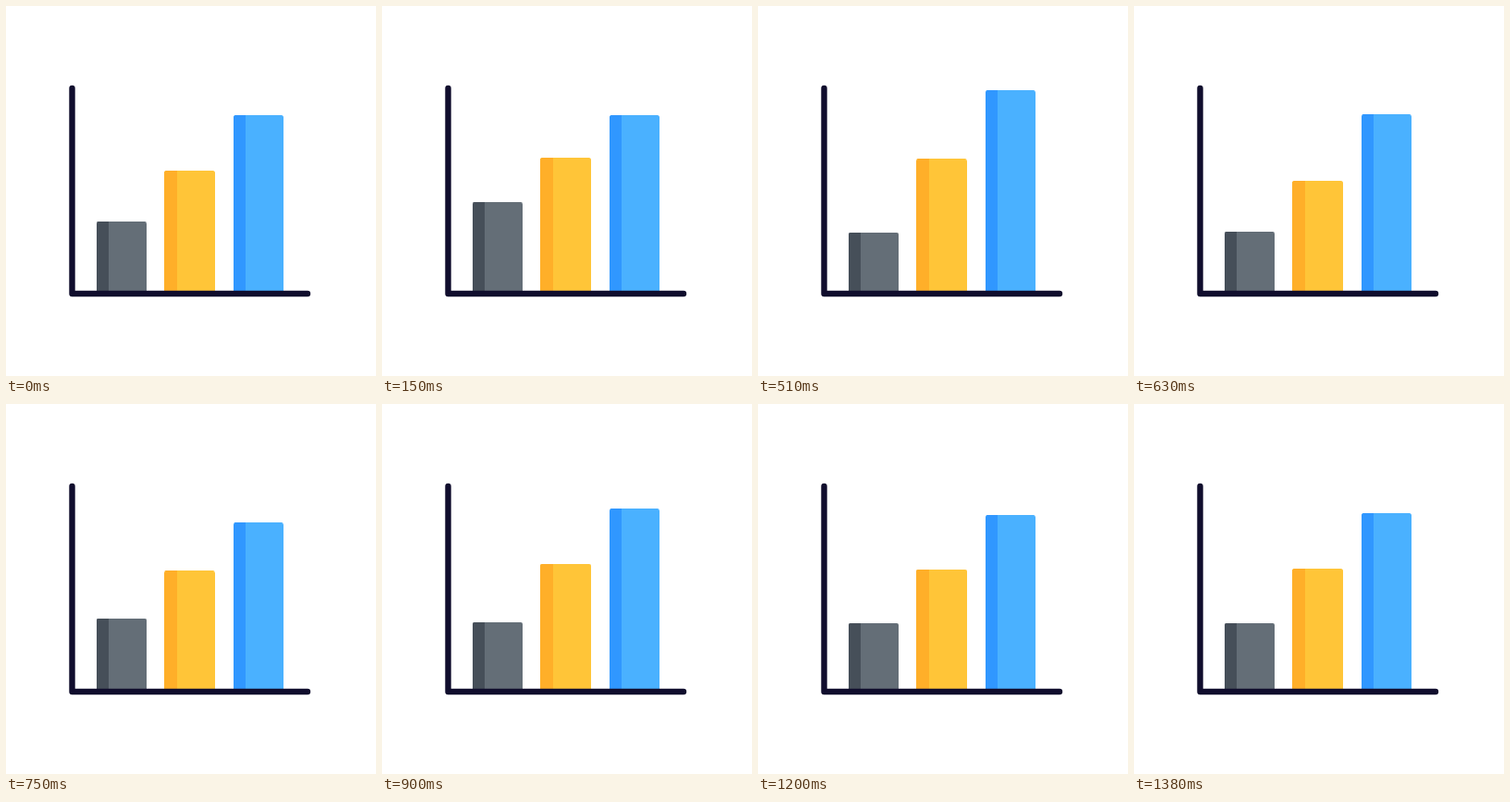
These frames come from a looping animation (400x400 px, 1.44 s). An HTML page:

```html
<!DOCTYPE html>
<html lang="en">
<head>
<meta charset="utf-8">
<title>Bar chart</title>
<style>
  html, body {
    margin: 0;
    width: 100%;
    height: 100%;
    overflow: hidden;
    background: #fff;
  }

  svg {
    display: block;
    width: 100%;
    height: 100%;
  }

  .bar {
    animation: bounce 1440ms infinite;
    animation-delay: var(--delay, 0ms);
  }

  /* Negative delays: each bar trails the one before it by 80 ms. */
  .second { --delay: -1360ms; }
  .third { --delay: -1280ms; }

  .axis {
    fill: none;
    stroke: #100d2d;
    stroke-width: 6.4;
    stroke-linecap: round;
    stroke-linejoin: round;
  }

  /* Rise, drop past the rest height, then settle. */
  @keyframes bounce {
    0% {
      transform: translateY(0);
      animation-timing-function: cubic-bezier(.5, 1, .89, 1);
    }
    18.4% {
      transform: translateY(-30.4px);
      animation-timing-function: cubic-bezier(.65, 0, .6, 1);
    }
    39% {
      transform: translateY(11px);
      animation-timing-function: cubic-bezier(.37, 0, .63, 1);
    }
    54.2% {
      transform: translateY(-6.1px);
      animation-timing-function: cubic-bezier(.37, 0, .63, 1);
    }
    69.2% {
      transform: translateY(2.5px);
      animation-timing-function: cubic-bezier(.37, 0, .63, 1);
    }
    82%, 100% {
      transform: translateY(0);
    }
  }
</style>
</head>
<body>
<svg viewBox="0 0 400 400">
  <defs>
    <clipPath id="plot"><rect width="400" height="310"/></clipPath>
  </defs>
  <g clip-path="url(#plot)">
    <g class="bar">
      <rect x="98" y="237" width="54" height="130" rx="2" fill="#646e77"/>
      <path d="M111 237H100a2 2 0 0 0-2 2V367H111Z" fill="#464f59"/>
    </g>
    <g class="bar second">
      <rect x="171" y="178" width="55" height="190" rx="2.5" fill="#ffc538"/>
      <path d="M185 178H173.500a2.500 2.500 0 0 0-2.500 2.500V367H185Z" fill="#ffaf29"/>
    </g>
    <g class="bar third">
      <rect x="246" y="118" width="54" height="250" rx="2.5" fill="#4ab1ff"/>
      <path d="M259 118H248.500a2.500 2.500 0 0 0-2.500 2.500V367H259Z" fill="#3097ff"/>
    </g>
  </g>
  <path class="axis" d="M71.500 89V311H326"/>
</svg>
</body>
</html>
```
